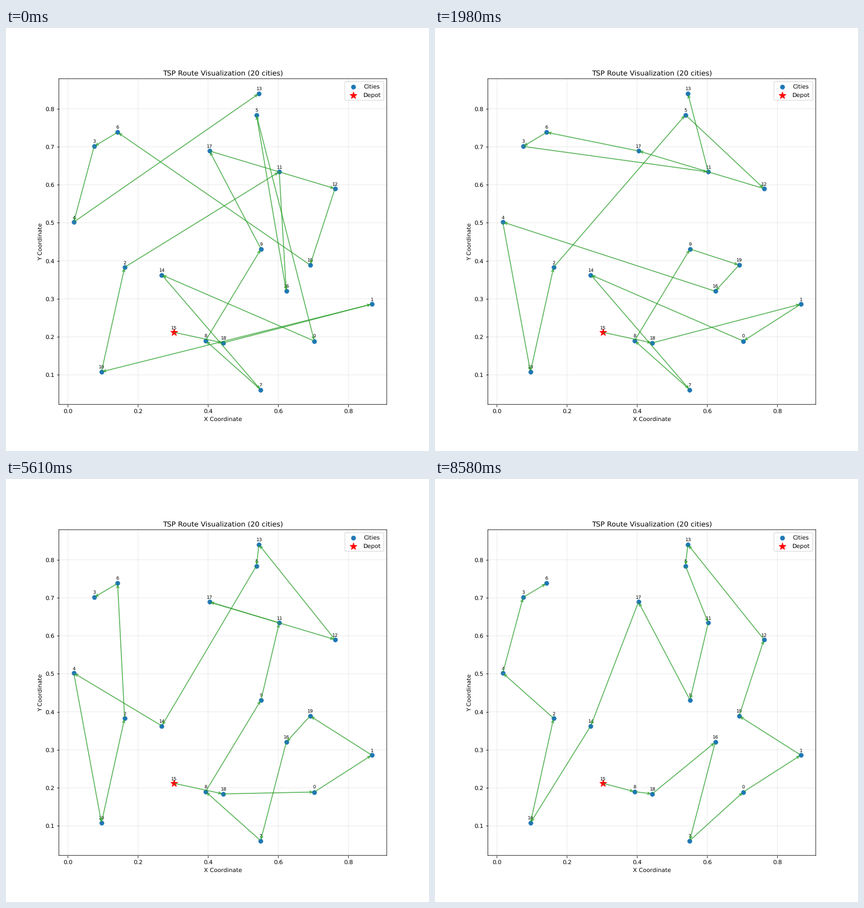
A matplotlib script that plays this animation: 748x748 px, repeating every 8910 ms.

```python
import matplotlib.pyplot as plt
from matplotlib.animation import FuncAnimation

# City positions by label, listed in the order of the first route.
CITIES = {
    15: (0.302, 0.212), 18: (0.443, 0.184), 1: (0.867, 0.286),
    10: (0.096, 0.108), 2: (0.162, 0.383), 11: (0.603, 0.634),
    16: (0.623, 0.320), 5: (0.538, 0.784), 0: (0.703, 0.189),
    14: (0.268, 0.363), 7: (0.550, 0.061), 8: (0.393, 0.190),
    9: (0.551, 0.431), 17: (0.404, 0.689), 12: (0.762, 0.590),
    19: (0.691, 0.389), 6: (0.142, 0.738), 3: (0.075, 0.701),
    4: (0.017, 0.502), 13: (0.545, 0.840),
}
DEPOT, *STOPS = CITIES

# Each 2-opt step reverses the stretch of the route between two positions.
STEPS = [
    (5, 7), (7, 18), (10, 12), (6, 11), (3, 17), (11, 17), (2, 3),
    (16, 19), (4, 19), (4, 10), (6, 7), (14, 19), (9, 19), (4, 10),
    (8, 9), (6, 13), (9, 13), (15, 17), (18, 19), (2, 5), (10, 13),
    (1, 7), (2, 7), (4, 7), (8, 12), (15, 16),
]


def route_after(count):
    route = list(CITIES)
    for i, j in STEPS[:count]:
        route[i:j + 1] = reversed(route[i:j + 1])
    return route


# Soft edges: no pixel snapping of lines, no hinting of text.
plt.rcParams.update({
    "font.family": "DejaVu Sans",
    "path.snap": False,
    "text.hinting": "none",
})
fig, ax = plt.subplots(figsize=(10, 10), dpi=74.8)

ax.scatter(*zip(*(CITIES[c] for c in STOPS)), s=50, c="tab:blue",
           label="Cities")
ax.scatter(*CITIES[DEPOT], s=150, c="red", marker="*", label="Depot", zorder=2)
for city, point in CITIES.items():
    ax.annotate(str(city), point, xytext=(0, 5), textcoords="offset points",
                ha="center", fontsize=8)

ax.set_title(f"TSP Route Visualization ({len(CITIES)} cities)")
ax.set_xlabel("X Coordinate")
ax.set_ylabel("Y Coordinate")
ax.grid(True, alpha=0.3)
ax.legend(loc="upper right")

STYLE = dict(arrowstyle="->", color="tab:green", lw=1.5, alpha=0.8)
start = CITIES[DEPOT]
arrows = [ax.annotate("", xy=start, xytext=start, arrowprops=STYLE)
          for _ in STOPS]


def draw(frame):
    route = route_after(frame)
    for arrow, a, b in zip(arrows, route, route[1:]):
        arrow.set_position(CITIES[a])
        arrow.xy = CITIES[b]
    return arrows


anim = FuncAnimation(fig, draw, frames=len(STEPS) + 1, interval=330,
                     repeat=True, repeat_delay=0, blit=False)
plt.show()
```
